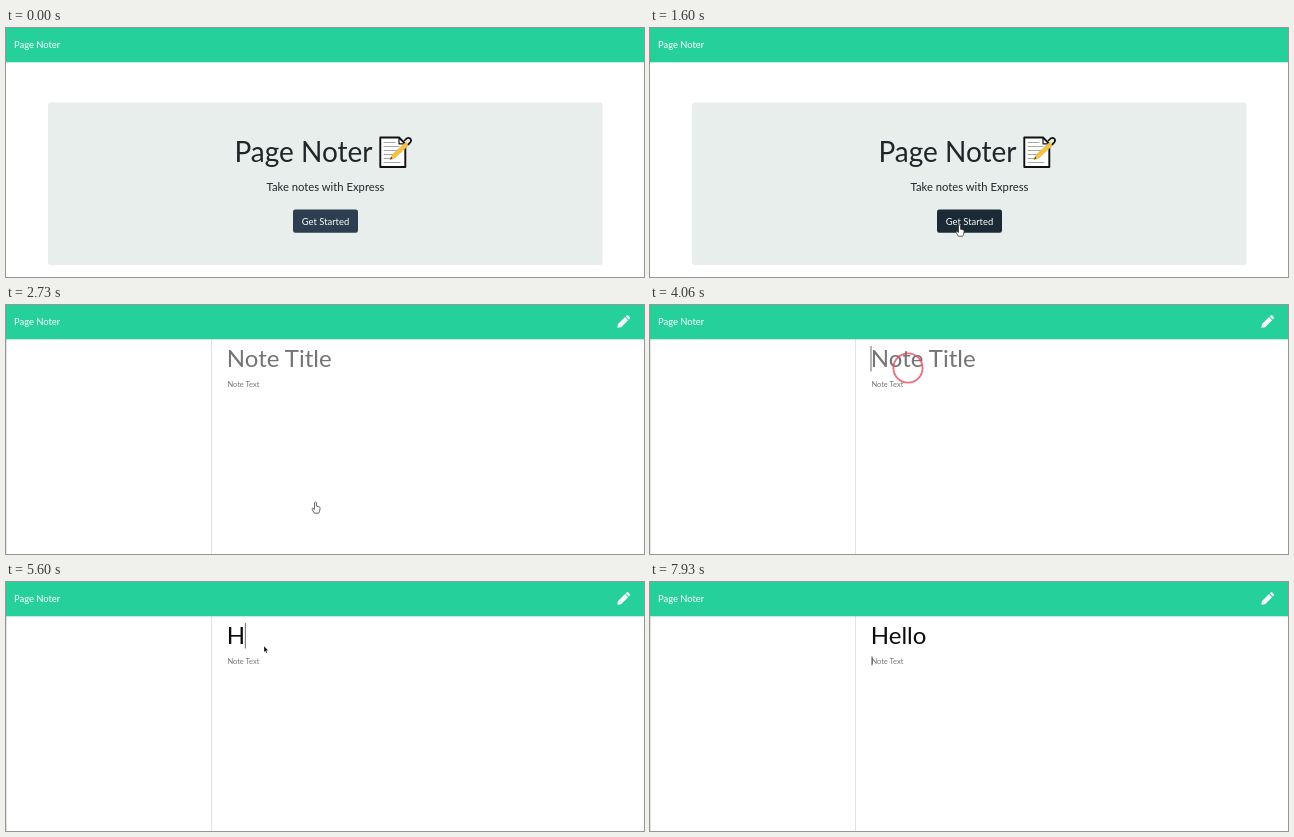
An HTML page for the animation above (8000 ms loop, 638 by 249 pixels).

```html
<!DOCTYPE html>
<html lang="en">
<head>
<meta charset="utf-8">
<title>Page Noter</title>
<style>
  html, body { margin: 0; width: 100%; height: 100%; overflow: hidden; background: #fff; }
  svg { display: block; width: 638px; height: 249px; font-family: Lato, "Open Sans", sans-serif; }
  .center { text-anchor: middle; }
</style>
</head>
<body>
<svg viewBox="0 0 638 249">
  <rect width="638" height="249" fill="#fff"/>

  <g id="home">
    <rect x="42" y="74.5" width="554.5" height="162.5" rx="2.5" fill="#e8eeec"/>
    <text class="center" x="297.5" y="133.5" font-size="28" fill="#212529">Page Noter</text>
    <text class="center" x="319.5" y="163" font-size="11.25" fill="#212529">Take notes with Express</text>
    <g stroke-linejoin="round" stroke-linecap="round">
      <path d="M374.3 109.5H393l6.3 6.3V139h-25z" fill="#fff" stroke="#111" stroke-width="1.9"/>
      <path d="M393 109.5v6.3h6.3" fill="none" stroke="#111" stroke-width="1.2"/>
      <path d="M378 114.5h11M378 118.5h15M378 122.5h13M378 126.5h10M378 130.5h6M378 134.5h16"
            stroke="#a4a8a8" stroke-width="1"/>
      <path d="M384 131.5l2.3-4.8 14.2-13.2 3 3-14.5 13.3z" fill="#f5c344" stroke="#dba62e" stroke-width=".5"/>
      <path d="M384 131.5l1.2-2.5 1.3 1.3z" fill="#222"/>
      <path d="M398.5 112.5l2.3-2.2q2-1.2 3.5.3t.2 3.5l-2.1 2.2" fill="#e6ebea" stroke="#111" stroke-width="1.7"/>
    </g>
    <rect id="focusRing" x="286" y="180.5" width="67" height="25.5" rx="3" fill="#8b9298"/>
    <rect id="button" x="287" y="181.5" width="65" height="23.3" rx="2.3"/>
    <text class="center" x="319.5" y="196.6" font-size="9.4" fill="#fff">Get Started</text>
  </g>

  <g id="notes">
    <path d="M.5 34V249M205.5 34V249" stroke="#dfe2e6" stroke-width="1"/>
    <text id="noteTitle" x="220.8" y="62" font-size="24"></text>
    <text x="221.4" y="82" font-size="7.5" fill="#757575">Note Text</text>
    <path id="titleCaret" d="M0 41V66.5" stroke="#444" stroke-width=".8"/>
    <path id="bodyCaret" d="M222 74.5V83.5" stroke="#222" stroke-width=".8"/>
  </g>

  <rect width="638" height="34.3" fill="#25d09b"/>
  <text x="8" y="20.3" font-size="9.4" fill="#fff">Page Noter</text>
  <g id="pencil" fill="#f4fbf8">
    <path d="M611.3 22.8l.7-3.7 7-7 3.1 3.1-7 7z"/>
    <path d="M619.7 11.4l1-1q.8-.6 1.5 0l1.6 1.6q.6.8 0 1.5l-1 1z"/>
  </g>

  <circle id="clickRing" fill="none" stroke="#e4485a" stroke-width="1.9"/>
  <path id="arrow" d="M0 0V6.2L1.4 5 2.3 7.2 3.3 6.8 2.4 4.6H4.3z" fill="#111" stroke="#fff" stroke-width=".3"/>
  <path id="hand" d="M-1 .7Q0-.6 1 .7V4.2L3.9 5Q4.8 5.3 4.6 6.4L4 9.5 3.2 11.2H-1.2L-3.2 7.8Q-3.9 6.4-2.9 6.2L-1 7.4z"
        fill="#fff" stroke="#333" stroke-width=".75" stroke-linejoin="round"/>
</svg>

<script>
const LOOP = 8000;
const PAGE_SWITCH = 2730;
const BLINK = 530;
const CLICK_LENGTH = 420;
const clicks = [
  { at: 2080, x: 310, y: 198 },
  { at: 3860, x: 258, y: 63 },
  { at: 7360, x: 240, y: 82 },
];
const keys = [[5400, "H"], [5920, "e"], [6200, "l"], [6380, "l"], [6640, "o"]];
const moves = [
  { from: 950, to: 1500, start: [298, 256], end: [309.5, 197] },
  { from: 2840, to: 3460, start: [309.5, 197], end: [258, 64] },
];

const parts = {};
document.querySelectorAll("[id]").forEach(node => parts[node.id] = node);

const show = (node, visible) => node.setAttribute("display", visible ? "inline" : "none");
const set = (node, attrs) => Object.entries(attrs).forEach(([k, v]) => node.setAttribute(k, v));
const clamp = v => Math.max(0, Math.min(1, v));
const ease = v => v * v * (3 - 2 * v);
const blinkOn = elapsed => elapsed >= 0 && elapsed % (2 * BLINK) < BLINK;

function pointerAt(t) {
  const move = t < moves[1].from ? moves[0] : moves[1];
  const p = ease(clamp((t - move.from) / (move.to - move.from)));
  return move.start.map((v, i) => v + (move.end[i] - v) * p);
}

function drawPointer(t, x, y, hovering) {
  const moving = t >= moves[0].from && t < moves[1].to;
  const useHand = hovering || (t >= PAGE_SWITCH && t < moves[1].from);
  const typing = t >= 5300 && t < 7060;
  show(parts.hand, useHand);
  show(parts.arrow, typing || (moving && !useHand));
  const transform = `translate(${x} ${y})`;
  set(parts.hand, { transform });
  set(parts.arrow, { transform });
}

function drawClick(t) {
  const click = clicks.find(c => t >= c.at && t < c.at + CLICK_LENGTH);
  show(parts.clickRing, click);
  if (!click) return;
  const p = (t - click.at) / CLICK_LENGTH;
  set(parts.clickRing, {
    cx: click.x, cy: click.y,
    r: 17 * (1 - (1 - p) ** 3),
    opacity: clamp((1 - p) * 1.5),
  });
}

function drawNote(t) {
  const typed = keys.filter(([at]) => t >= at);
  const title = typed.map(([, letter]) => letter).join("");
  parts.noteTitle.textContent = title || "Note Title";
  set(parts.noteTitle, { fill: title ? "#0d0d0d" : "#757575" });

  const lastInput = typed.length ? typed[typed.length - 1][0] : clicks[1].at;
  const caretX = 221 + (title ? parts.noteTitle.getComputedTextLength() : 0);
  set(parts.titleCaret, { transform: `translate(${caretX} 0)` });
  show(parts.titleCaret, t < clicks[2].at && blinkOn(t - lastInput));
  show(parts.bodyCaret, blinkOn(t - clicks[2].at - 60));
}

function render(t) {
  const onNotes = t >= PAGE_SWITCH;
  const [x, y] = pointerAt(t);
  const hovering = !onNotes && y < 204.5;
  show(parts.home, !onNotes);
  show(parts.notes, onNotes);
  show(parts.pencil, onNotes);
  show(parts.focusRing, t >= clicks[0].at);
  set(parts.button, { fill: hovering ? "#1c2a36" : "#2c3e50" });
  if (onNotes) drawNote(t);
  drawPointer(t, x, y, hovering);
  drawClick(t);
}

const began = performance.now();
function tick() {
  render((performance.now() - began) % LOOP);
  requestAnimationFrame(tick);
}
tick();
</script>
</body>
</html>
```
